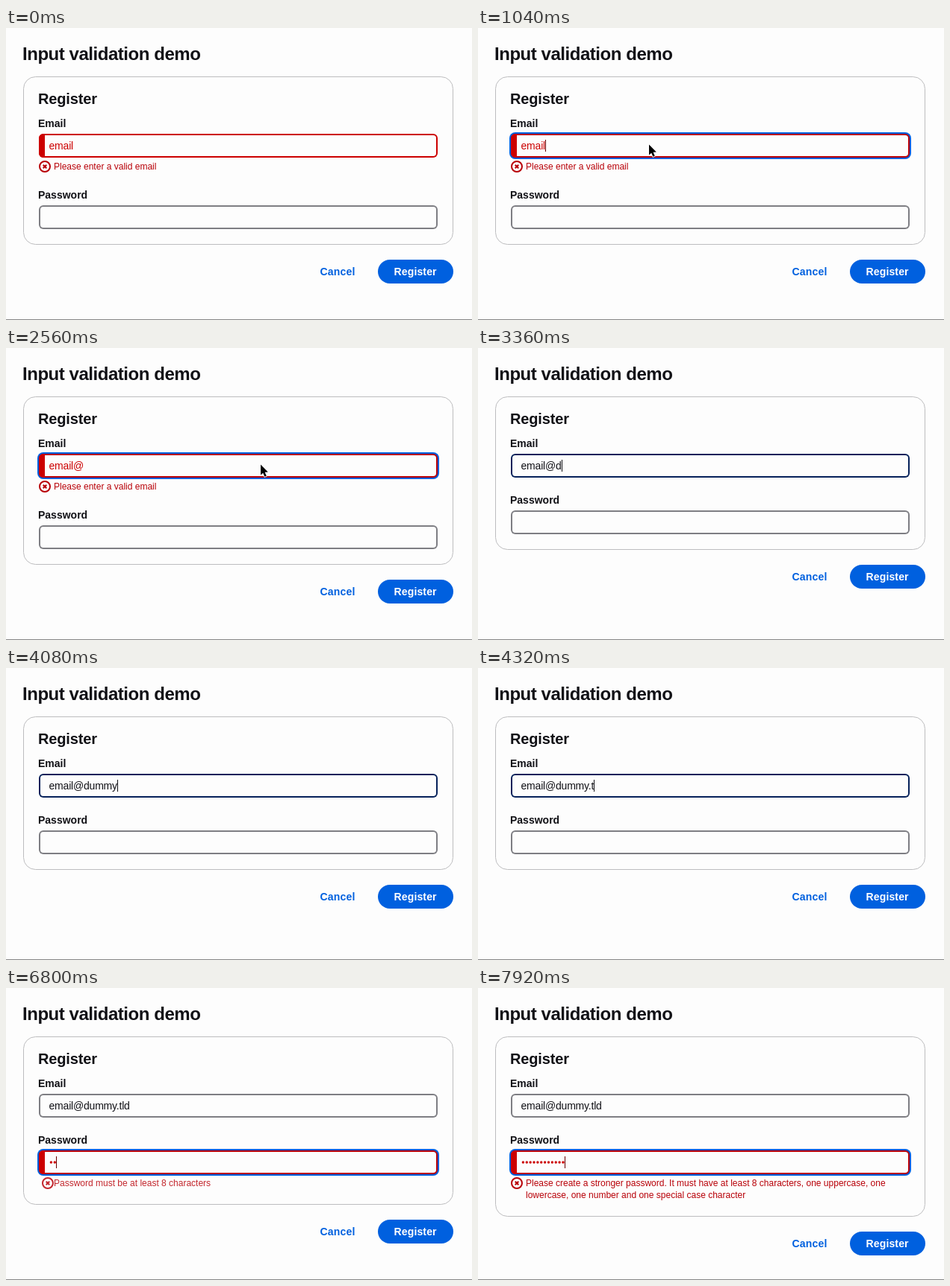
Write an HTML page with a canvas that moves like this. It is 624 by 392 pixels and loops after 8 s.

```html
<!DOCTYPE html>
<html lang="en">
<head>
<meta charset="utf-8">
<title>Input validation demo</title>
<style>
  html, body { margin: 0; width: 100%; height: 100%; overflow: hidden; background: #fdfdfd; }
  canvas { display: block; }
</style>
</head>
<body>
<canvas id="stage" width="624" height="392"></canvas>
<script>
const ctx = document.getElementById('stage').getContext('2d');
const LOOP = 8000;
const FONT = '"Liberation Sans", Arial, sans-serif';
const INK = '#111116', BLUE = '#0060df', RED = '#cc0000', DARK_RED = '#b80008';
const NAVY = '#06215a', GREY = '#7e7e83', PAGE = '#fdfdfd';

// Timeline
const ADDRESS = 'email@dummy.tld';
const EMAIL_KEYS = [1700, 3200, 3440, 3620, 3780, 3940, 4090, 4270, 4430, 4580];
const EMAIL_FOCUS = 800, TAB = 5200;
const DOT_START = 6605, DOT_STEP = 95, DOT_MAX = 12;
const POINTER_SHOW = 480, POINTER_HIDE = 3200;

const clamp = (v, a, b) => Math.min(b, Math.max(a, v));
const progress = (t, a, b) => clamp((t - a) / (b - a), 0, 1);
const smooth = p => p * p * (3 - 2 * p);
const mix = (a, b, p) => a + (b - a) * p;

function text(str, x, y, size, color, bold = false, spacing = 0) {
  ctx.font = `${bold ? 'bold ' : ''}${size}px ${FONT}`;
  ctx.letterSpacing = spacing + 'px';
  ctx.fillStyle = color;
  ctx.fillText(str, x, y);
  return x + ctx.measureText(str).width;
}

function box(x, y, w, h, r, fill, stroke, line = 1) {
  ctx.beginPath();
  ctx.roundRect(x, y, w, h, r);
  if (fill) { ctx.fillStyle = fill; ctx.fill(); }
  if (stroke) { ctx.strokeStyle = stroke; ctx.lineWidth = line; ctx.stroke(); }
}

function field(y, focused, invalid) {
  if (focused && invalid) box(42, y - 2, 538, 36, 8, BLUE);
  const edge = invalid ? (focused ? DARK_RED : RED) : focused ? NAVY : GREY;
  box(44, y, 534, 32, 6, edge);
  box(46, y + 2, 530, 28, 4, PAGE);
  if (invalid) box(44, y, 8, 32, [6, 0, 0, 6], RED);
}

function caret(x, y, t, since, color) {
  if ((t - since) % 1060 >= 530) return;
  ctx.fillStyle = color;
  ctx.fillRect(Math.round(x), y + 8, 1, 16);
}

// The icon slides in from the right while the message fades up.
function message(lines, y, p) {
  ctx.save();
  ctx.globalAlpha = 0.7 + 0.3 * p;
  ctx.translate(8 * (1 - p), 0);
  ctx.strokeStyle = DARK_RED;
  ctx.lineWidth = 2;
  ctx.beginPath();
  ctx.arc(52, y + 44, 7, 0, Math.PI * 2);
  ctx.moveTo(49.7, y + 41.7);
  ctx.lineTo(54.3, y + 46.3);
  ctx.moveTo(54.3, y + 41.7);
  ctx.lineTo(49.7, y + 46.3);
  ctx.stroke();
  ctx.translate(-8 * (1 - p), 0);
  lines.forEach((s, i) => text(s, 64, y + 48 + 16 * i, 12, DARK_RED));
  ctx.restore();
}

function pointer(x, y) {
  const shape = [[0, 0], [0, 14], [3.2, 11.2], [5.4, 16.2], [7.8, 15.2], [5.6, 10.3], [9.8, 10]];
  ctx.beginPath();
  shape.forEach(([dx, dy]) => ctx.lineTo(x + dx, y + dy));
  ctx.closePath();
  ctx.lineJoin = 'round';
  ctx.strokeStyle = '#fff';
  ctx.lineWidth = 2;
  ctx.stroke();
  ctx.fillStyle = '#000';
  ctx.fill();
}

function drawPointer(t) {
  if (t < POINTER_SHOW || t >= POINTER_HIDE) return;
  const rise = smooth(progress(t, POINTER_SHOW, 760));
  const glide = smooth(progress(t, 2060, 2500));
  pointer(mix(240, 229, rise) + 112 * glide, mix(190, 156.5, rise));
}

function draw(t) {
  const typed = EMAIL_KEYS.filter(k => t >= k).length;
  const value = ADDRESS.slice(0, 5 + typed);
  const emailBad = !/@\w+(\.\w+)?$/.test(value);
  const emailFocus = t >= EMAIL_FOCUS && t < TAB;

  const dots = clamp(Math.floor((t - DOT_START) / DOT_STEP), 0, DOT_MAX);
  const passBad = dots > 0;
  const passFocus = t >= TAB;
  const passLines = dots < 8
    ? ['Password must be at least 8 characters']
    : ['Please create a stronger password. It must have at least 8 characters, one uppercase, one',
       'lowercase, one number and one special case character'];

  const emailY = 142;
  const passY = emailBad ? 238 : 218;
  const bottom = passY + 52 + (passBad ? 4 + 16 * passLines.length : 0);

  ctx.fillStyle = PAGE;
  ctx.fillRect(0, 0, 624, 392);
  ctx.fillStyle = '#858585';
  ctx.fillRect(0, 391, 624, 1);

  text('Input validation demo', 22, 43, 24, INK, true, -0.46);
  box(23.5, 65.5, 575, bottom - 65, 16, null, '#bdbdbf');
  text('Register', 43, 102, 20, INK, true, -0.15);

  text('Email', 43, 133, 14, INK, true);
  field(emailY, emailFocus, emailBad);
  const end = text(value, 57.5, emailY + 21, 14, emailBad ? RED : INK, false, -0.2);
  if (emailFocus) {
    const last = typed ? EMAIL_KEYS[typed - 1] : EMAIL_FOCUS;
    caret(end, emailY, t, last, emailBad ? '#600' : INK);
  }
  if (emailBad) {
    const shown = typed ? progress(t, EMAIL_KEYS[typed - 1], EMAIL_KEYS[typed - 1] + 200) : 1;
    message(['Please enter a valid email'], emailY, typed > 1 ? shown : 1);
  }

  text('Password', 43, passY - 9, 14, INK, true);
  field(passY, passFocus, passBad);
  ctx.fillStyle = RED;
  for (let i = 0; i < dots; i++) {
    ctx.beginPath();
    ctx.arc(60.4 + 4.87 * i, passY + 16, 1.7, 0, Math.PI * 2);
    ctx.fill();
  }
  if (passFocus) {
    const last = dots ? DOT_START + dots * DOT_STEP : TAB;
    caret(57.6 + 4.87 * dots, passY, t, last, passBad ? '#600' : INK);
  }
  if (passBad) {
    const first = DOT_START + DOT_STEP;
    message(passLines, passY, progress(t, first, first + 200));
  }

  const buttonY = bottom + 21;
  text('Cancel', 420.5, buttonY + 21, 14, BLUE, true, 0.2);
  box(498, buttonY, 101, 32, 16, BLUE);
  text('Register', 519.5, buttonY + 21, 14, '#fff', true, 0.15);

  drawPointer(t);
}

const start = performance.now();
function tick() {
  draw((performance.now() - start) % LOOP);
  requestAnimationFrame(tick);
}
tick();
</script>
</body>
</html>
```
